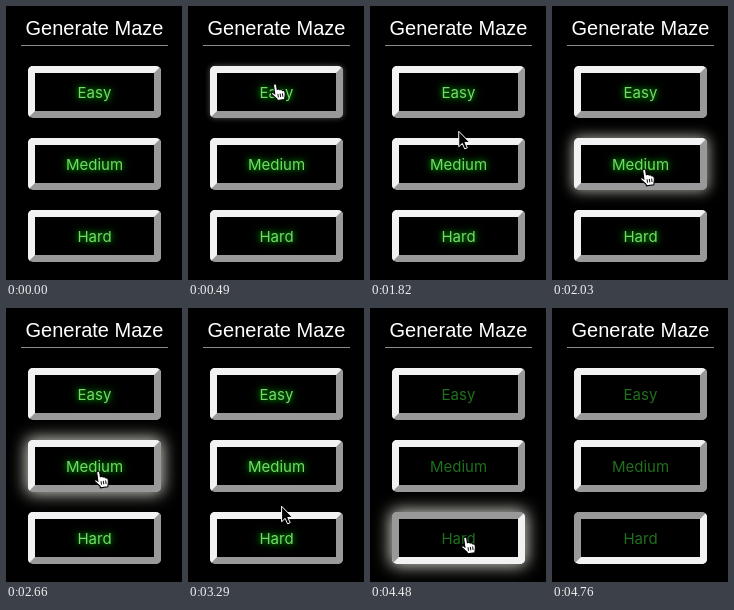
Animation of 176 by 274 pixels, one loop 5390 ms. Source, as an HTML page:

```html
<!DOCTYPE html>
<html lang="en">
<head>
<meta charset="utf-8">
<title>Generate Maze</title>
<style>
html, body { margin: 0; width: 100%; height: 100%; overflow: hidden; background: #000; }
h1 {
  position: absolute; left: 15px; top: 5px; width: 147px; height: 34px; margin: 0;
  border-bottom: 1px solid #8c8c8c;
  font: 20px/34px "Liberation Sans", Arial, sans-serif;
  color: #fff; text-align: center; white-space: nowrap;
}
.button {
  position: absolute; left: 22px; top: calc(60px + 72px * var(--row));
  width: 133px; height: 52px; box-sizing: border-box;
  border: 7px solid; border-color: #f2f2f2 #999 #999 #f2f2f2; border-radius: 5px;
  background: #000; color: #74d968; text-shadow: 0 0 8px #0b0, 0 0 5px #060;
  font: 15px/39px Inter, sans-serif; text-align: center;
}
.pressed { border-color: #999 #f2f2f2 #f2f2f2 #999; }
.off .button { color: #1f701c; text-shadow: none; }
svg { position: absolute; left: 0; top: 0; }
</style>
</head>
<body>
<h1>Generate Maze</h1>
<div class="button" style="--row:0">Easy</div>
<div class="button" style="--row:1">Medium</div>
<div class="button" style="--row:2">Hard</div>
<svg width="176" height="274">
  <g id="ring" fill="none">
    <circle cx="96" cy="229" r="28.8" stroke="#fff" stroke-width="5.5"/>
    <circle cx="96" cy="229" r="28.8" stroke="#000" stroke-width="2.6"/>
  </g>
  <g id="cursor">
    <path id="arrow" d="M0 0V15.5L3.6 12.2L6 17.6L8.6 16.5L6.2 11.2H11Z" fill="#000" stroke="#fff"/>
    <g id="hand" stroke="#000" transform="rotate(-8)">
      <path d="M-1.5 1.5Q0 -1.5 1.5 1.5V6Q4 5.2 4.2 6.8Q6.4 6.3 6.6 8Q8.8 7.8 8.8 9.5V12L7.5 17H0V15.5L-4.5 10Q-5 8 -3 8.5L-1.5 10Z" fill="#fff"/>
      <path d="M1.6 10.5V14M3.9 10.5V14M6.2 10.5V14" stroke-width=".9"/>
    </g>
  </g>
</svg>
<script>
const LOOP = 5390, TICK = 70;
const FIRST = 120, LEG = 1470, MOVE = 440;  // the cursor sets off once per leg
const ENTER = 280, FADE = 230;              // hover begins partway through a move
const PRESS = 3570;
const stops = [[112, 19], [85, 82], [92, 163], [95, 229], [97, 330]];

const $ = id => document.getElementById(id);
const buttons = [...document.querySelectorAll('.button')];
const clamp = v => Math.max(0, Math.min(1, v));
const ease = v => { const p = clamp(v); return p * p * (3 - 2 * p); };
const show = (id, on) => $(id).style.display = on ? '' : 'none';

function drawCursor(t, over) {
  const leg = Math.max(0, Math.floor((t - FIRST) / LEG));
  const p = ease((t - FIRST - leg * LEG) / MOVE);
  const at = stops[leg].map((v, i) => v + (stops[leg + 1][i] - v) * p);
  $('cursor').setAttribute('transform', `translate(${at})`);
  show('cursor', t >= TICK);
  show('hand', over);
  show('arrow', !over);
}

function draw(now) {
  const t = Math.floor(now % LOOP / TICK) * TICK;
  let over = false;

  buttons.forEach((b, i) => {
    const enter = FIRST + i * LEG + ENTER, leave = FIRST + (i + 1) * LEG;
    const glow = ease((t - enter) / FADE) - ease((t - leave) / FADE);
    b.style.boxShadow = `0 0 ${16 * glow}px ${2 * glow}px rgba(205,205,196,${glow})`;
    over ||= t >= enter && t < leave;
  });
  drawCursor(t, over);

  buttons[2].classList.toggle('pressed', t >= PRESS);
  document.body.classList.toggle('off', t >= PRESS + 140);
  $('ring').style.opacity = t < PRESS ? 0 : clamp(1 - (t - PRESS) / 210);
}

let start;
function frame(now) {
  start ??= now;
  draw(now - start);
  requestAnimationFrame(frame);
}
draw(0);
requestAnimationFrame(frame);
</script>
</body>
</html>
```
